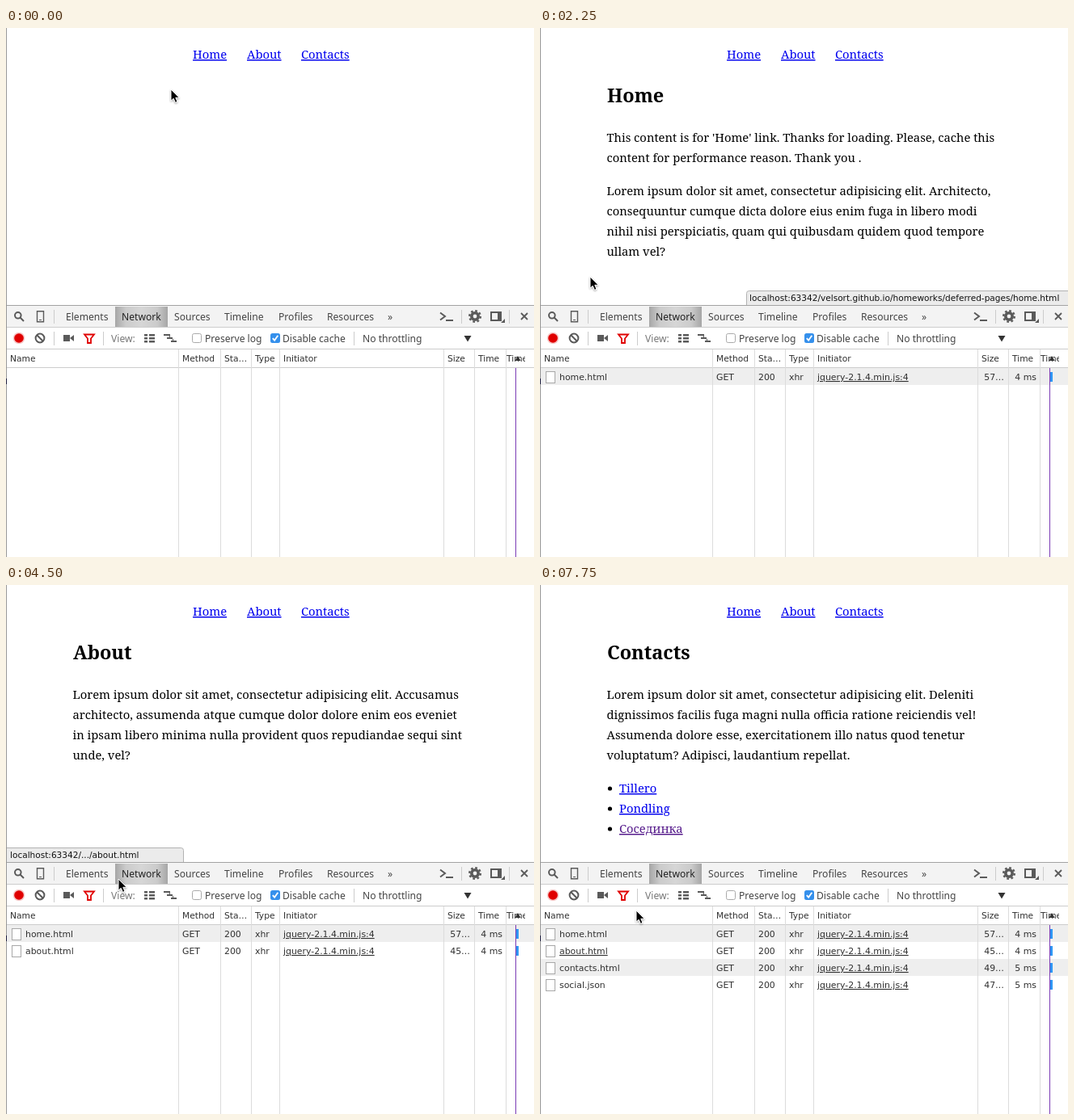
These frames come from a looping animation (653x655 px, 8 s). An HTML page:

```html
<!DOCTYPE html>
<html lang="en">
<head>
<meta charset="utf-8">
<title>Deferred pages</title>
<style>
html, body { margin: 0; width: 100%; height: 100%; overflow: hidden; background: #fff; }
svg { display: block; width: 653px; height: 655px; }
text { white-space: pre; }
.page { font: 14.75px "Noto Serif", serif; fill: #000; }
.title { font-size: 23.5px; font-weight: bold; }
.link { fill: #00e; text-decoration: underline; }
.link.hot { fill: #c00; }
.link.visited { fill: #551a8b; }
.bar { font: 12.1px "Noto Sans", sans-serif; fill: #444; }
.grid { font: 10.9px "DejaVu Sans", sans-serif; fill: #303030; }
.head { font-size: 10.7px; }
.status { font: 10.55px "DejaVu Sans", sans-serif; fill: #111; }
.end { text-anchor: end; }
.under { text-decoration: underline; }
.crisp { shape-rendering: crispEdges; }
.line { fill: none; stroke: #5a5a5a; }
.icon { fill: #5a5a5a; }
.hidden { display: none; }
</style>
</head>
<body>
<svg viewBox="0 0 653 655">
  <defs>
    <linearGradient id="tab">
      <stop offset="0" stop-color="#a6a6a6"/>
      <stop offset=".2" stop-color="#cbcbcb"/>
      <stop offset=".5" stop-color="#d6d6d6"/>
      <stop offset=".8" stop-color="#cbcbcb"/>
      <stop offset="1" stop-color="#a6a6a6"/>
    </linearGradient>
    <clipPath id="timeline"><path d="M619 398h23v23h-23z"/></clipPath>
    <filter id="shade" x="-50%" y="-50%" width="200%" height="200%">
      <feDropShadow dx="0" dy="1" stdDeviation="1" flood-opacity=".4"/>
    </filter>
  </defs>
  <rect width="653" height="655" fill="#fff"/>

  <g class="page">
    <g id="nav"></g>
    <g id="pages"></g>
  </g>

  <g id="status" class="status">
    <path id="bubble" fill="#ebebeb" stroke="#b2b2b2"/>
    <text id="url" y="338"></text>
  </g>

  <!-- panel -->
  <g class="crisp">
    <rect y="343" width="653" height="28" fill="#f3f3f3"/>
    <rect y="371" width="653" height="284" fill="#fff"/>
    <rect x="135" y="345" width="65" height="25" fill="url(#tab)"/>
    <path d="M0 343.5H653" stroke="#a3a3a3"/>
    <path d="M0 370.5H653M0 397.5H653M0 420.5H653" stroke="#cdcdcd"/>
    <path d="M59.5 349v17M563.5 349v17M622.5 349v17M59.5 376v17M120.5 376v17M430.5 376v17" stroke="#ccc"/>
  </g>
  <g id="tabs" class="bar"></g>

  <g class="line" stroke-width="2">
    <circle cx="14.8" cy="355.8" r="3.8"/>
    <path d="M17.5 358.5l4.5 4.5"/>
    <path d="M38.5 350.7h8v13h-8z" stroke-width="1.4"/>
    <path d="M41 361.5h3" stroke-width="1"/>
    <path d="M537 352.5l6 4.5-6 4.5M544 362h9"/>
    <circle cx="580" cy="357" r="4.2" stroke-width="3.6"/>
    <circle cx="580" cy="357" r="6.8" stroke-width="2.4" stroke-dasharray="2.67"/>
    <path d="M600 352h12v10h-12z"/>
    <path d="M637 353l8 8M645 353l-8 8" stroke-width="1.8"/>
    <circle cx="42" cy="384" r="5.4"/>
    <path d="M38.3 380.3l7.4 7.4"/>
  </g>
  <g class="icon">
    <path d="M608 352h5v11h-5zM617 360v5h-5z"/>
    <path d="M71 380h8v8h-8zM79 384l5-4v8z"/>
    <path d="M171 379h4v2.5h-4zM177 379h7v2.5h-7zM171 383h4v2.5h-4zM177 383h7v2.5h-7zM171 387h4v2.5h-4zM177 387h7v2.5h-7z"/>
    <path d="M195 379h8v2h-8zM199 383h7v2h-7zM204 387h7v2h-7z"/>
    <path d="M202.500 381v3M206.500 385v3" stroke="#5a5a5a"/>
    <path d="M566.500 381h9l-4.500 7.500z" fill="#333"/>
  </g>
  <circle cx="16" cy="384" r="7.300" fill="#f7c9c9"/>
  <circle cx="16" cy="384" r="5.800" fill="#e00000"/>
  <path d="M97 379.500h12l-4 5v5.500h-4v-5.500z" fill="#fff" stroke="#e00000" stroke-width="1.800"/>
  <rect x="230.500" y="378.500" width="11" height="11" rx="2" fill="#fff" stroke="#aaa"/>
  <rect x="327" y="378" width="12" height="12" rx="2.500" fill="#3590ec"/>
  <path d="M329.800 384.200l2.300 2.500 4.200-6" fill="none" stroke="#fff" stroke-width="1.800"/>

  <g id="rows" class="grid"></g>
  <path class="crisp" d="M213.500 398V655M265.500 398V655M303.500 398V655M338.500 398V655M541.500 398V655M579.500 398V655M618.500 398V655" stroke="#dcdcdc"/>
  <g id="heads" class="grid head"></g>
  <text class="grid head" x="619" y="413" clip-path="url(#timeline)">Timeline</text>
  <path d="M629.500 412h7l-3.500-6z" fill="#333"/>
  <g class="crisp">
    <path d="M630.500 421V655" stroke="#7a3bb5"/>
    <path d="M.5 0V655" stroke="#999"/>
    <path d="M.5 434v7" stroke="#202040"/>
  </g>

  <path id="cursor" filter="url(#shade)" d="M0 0V14.200L3.200 11.300 5.500 16.400 8 15.300 5.800 10.300H10.200Z" stroke="#fff" stroke-width="1"/>
</svg>
<script>
const $ = id => document.getElementById(id);

function add(parent, tag, attrs, content = "") {
  const el = document.createElementNS("http://www.w3.org/2000/svg", tag);
  for (const key in attrs) el.setAttribute(key, attrs[key]);
  el.textContent = content;
  return parent.appendChild(el);
}
const write = (parent, x, y, content, cls = "") =>
  add(parent, "text", { x, y, class: cls }, content);

const links = [["Home", 231], ["About", 298], ["Contacts", 365]]
  .map(([label, x]) => write($("nav"), x, 38, label, "link"));

function addPage(title, ...paragraphs) {
  const g = add($("pages"), "g", {});
  write(g, 83, 92, title, "title");
  let y = 141;
  for (const lines of paragraphs) {
    for (const line of lines) {
      write(g, 82.5, y, line);
      y += 25;
    }
    y += 16;
  }
  return g;
}

const pages = [
  addPage("Home",
    ["This content is for 'Home' link. Thanks for loading. Please, cache this",
     "content for performance reason. Thank you ."],
    ["Lorem ipsum dolor sit amet, consectetur adipisicing elit. Architecto,",
     "consequuntur cumque dicta dolore eius enim fuga in libero modi",
     "nihil nisi perspiciatis, quam qui quibusdam quidem quod tempore",
     "ullam vel?"]),
  addPage("About",
    ["Lorem ipsum dolor sit amet, consectetur adipisicing elit. Accusamus",
     "architecto, assumenda atque cumque dolor dolore enim eos eveniet",
     "in ipsam libero minima nulla provident quos repudiandae sequi sint",
     "unde, vel?"]),
  addPage("Contacts",
    ["Lorem ipsum dolor sit amet, consectetur adipisicing elit. Deleniti",
     "dignissimos facilis fuga magni nulla officia ratione reiciendis vel!",
     "Assumenda dolore esse, exercitationem illo natus quod tenetur",
     "voluptatum? Adipisci, laudantium repellat."]),
];

const social = add(pages[2], "g", {});
["Tillero", "Pondling", "Сосединка"].forEach((label, i) => {
  const y = 257 + i * 25;
  add(social, "circle", { cx: 86.5, cy: y - 5, r: 2.6 });
  write(social, 98, y, label, i == 2 ? "link visited" : "link");
});

[["Elements", 74], ["Network", 143], ["Sources", 208], ["Timeline", 270],
 ["Profiles", 337], ["Resources", 397], ["»", 472]]
  .forEach(([label, x]) => write($("tabs"), x, 362, label));
[["View:", 130], ["Preserve log", 246], ["Disable cache", 342], ["No throttling", 441]]
  .forEach(([label, x]) => write($("tabs"), x, 388.5, label));
$("tabs").children[1].style.fill = "#222";
$("tabs").children[7].style.fill = "#777";

[["Name", 5], ["Method", 218], ["Sta…", 270], ["Type", 308],
 ["Initiator", 343], ["Size", 546], ["Time", 584]]
  .forEach(([label, x]) => write($("heads"), x, 413, label));

const rows = [["home.html", 57, 4], ["about.html", 45, 4], ["contacts.html", 49, 5], ["social.json", 47, 5]]
  .map(([name, size, time], i) => {
    const g = add($("rows"), "g", { transform: `translate(0 ${421 + i * 21})` });
    if (i % 2 == 0) add(g, "rect", { width: 653, height: 21, fill: "#eee" });
    add(g, "rect", { x: 7.5, y: 4.5, width: 11, height: 14, fill: "#fff", stroke: "#a8a8a8" });
    const label = write(g, 24, 15, name);
    write(g, 218, 15, "GET");
    write(g, 270, 15, "200");
    write(g, 308, 15, "xhr");
    write(g, 343, 15, "jquery-2.1.4.min.js:4", "under");
    write(g, 574, 15, size + "…", "end");
    write(g, 614, 15, time + " ms", "end");
    add(g, "rect", { x: 631, y: 5, width: 3, height: 12, fill: "#2f96f3" });
    return { g, label };
  });

const shortUrl = name => `localhost:63342/.../${name}.html`;
const longUrl = "localhost:63342/velsort.github.io/homeworks/deferred-pages/home.html";

// Each entry: time, cursor position, and whatever else changes then.
const steps = [
  [0, 204, 76, { link: -1, page: -1, count: 0, over: -1, url: "", right: false, alpha: 1, list: false }],
  [250, 222, 58],
  [500, 242, 37, { link: 0, url: shortUrl("home"), alpha: .5 }],
  [750, 242, 37, { alpha: 1 }],
  [1250, 242, 37, { page: 0, count: 1 }],
  [2000, 242, 37, { url: longUrl }],
  [2250, 62, 308, { link: -1, right: true }],
  [2500, 55, 405, { url: "", right: false }],
  [2750, 54, 434, { over: 0 }],
  [3000, 56, 437],
  [3250, 150, 250, { over: -1 }],
  [3500, 304, 37, { link: 1, url: shortUrl("about"), alpha: .5 }],
  [3750, 304, 37, { alpha: 1 }],
  [4250, 304, 37, { page: 1, count: 2 }],
  [4500, 139, 364, { link: -1 }],
  [4750, 85, 440, { url: "" }],
  [5000, 68, 456, { over: 1 }],
  [5250, 64, 460],
  [5500, 66, 459],
  [5750, 215, 235, { over: -1 }],
  [6000, 388, 37, { link: 2, url: shortUrl("contacts"), alpha: .5 }],
  [6250, 388, 37, { alpha: 1 }],
  [6500, 388, 37, { page: 2, count: 3 }],
  [6750, 388, 37, { count: 4, list: true }],
  [7000, 190, 290, { link: -1 }],
  [7250, 84, 440, { url: "" }],
  [7500, 80, 457, { over: 1 }],
  [7750, 119, 403],
];

const show = (el, on) => el.classList.toggle("hidden", !on);

function drawStatus({ url, right, alpha }) {
  show($("status"), url);
  if (!url) return;
  const width = url == longUrl ? 398 : 219;
  const left = right ? 653 - width : 0;
  $("bubble").setAttribute("d", right
    ? `M${left + .5} 343.5V328.500q0-3 3-3H653.500V343.500Z`
    : `M.5 343.500V325.500H${width - 2.5}q3 0 3 3V343.500Z`);
  $("url").setAttribute("x", left + (right ? 4 : 5));
  $("url").textContent = url;
  $("status").setAttribute("opacity", alpha);
}

function draw(time) {
  const state = {};
  for (const [at, x, y, change] of steps)
    if (at <= time) Object.assign(state, { x, y }, change);

  links.forEach((el, i) => el.classList.toggle("hot", i == state.link));
  pages.forEach((el, i) => show(el, i == state.page));
  show(social, state.list);
  rows.forEach(({ g, label }, i) => {
    show(g, i < state.count);
    label.classList.toggle("under", i == state.over);
  });
  drawStatus(state);
  $("cursor").setAttribute("transform", `translate(${state.x} ${state.y})`);
}

const start = performance.now();
function tick() {
  draw((performance.now() - start) % 8000);
  requestAnimationFrame(tick);
}
tick();
</script>
</body>
</html>
```
